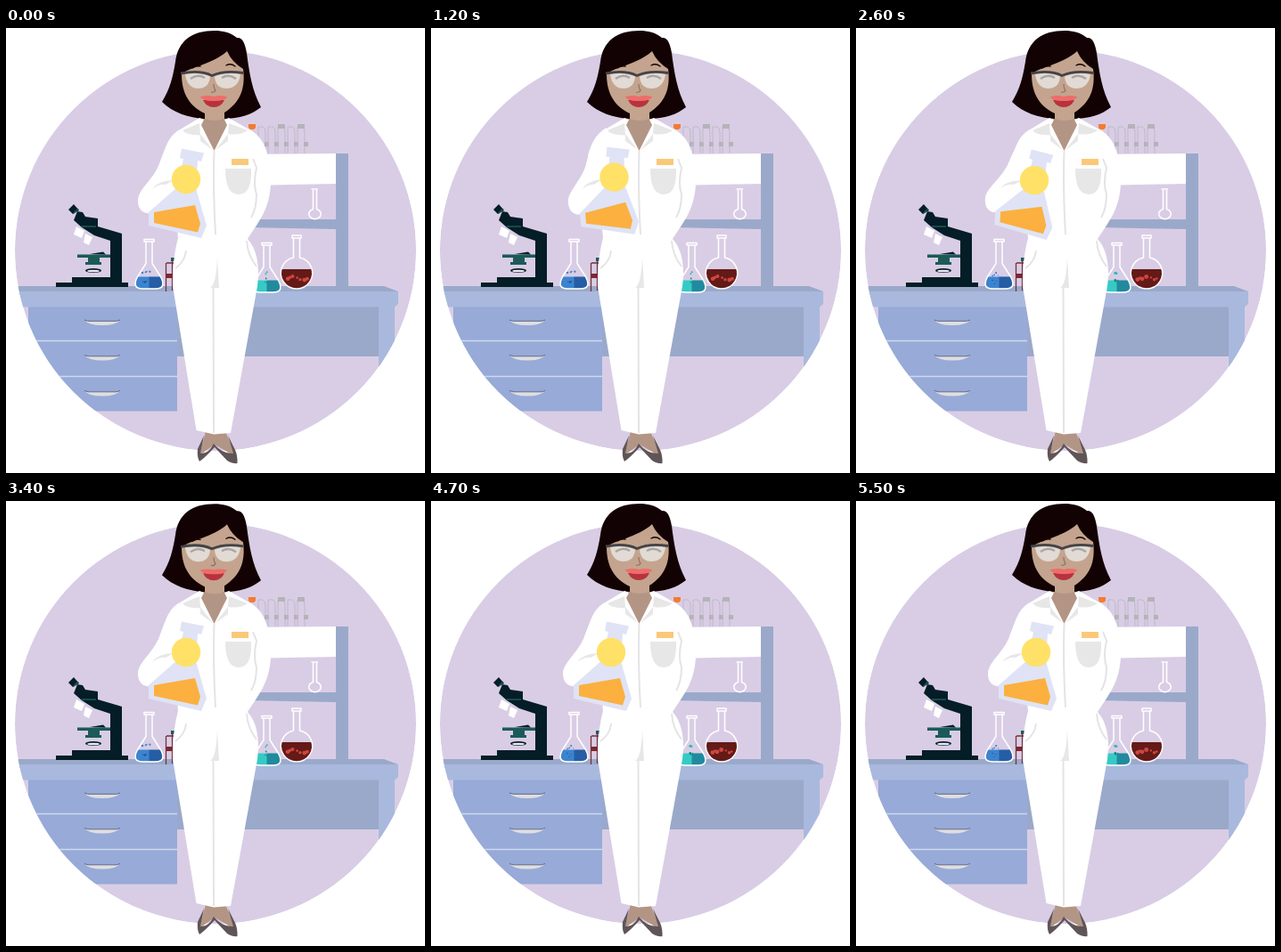
Animation of 470 by 500 pixels, one loop 6 s. Source, as an HTML page:

```html
<!DOCTYPE html>
<html lang="en">
<head>
<meta charset="utf-8">
<title>Scientist in the lab</title>
<style>
  html, body { margin: 0; width: 100%; height: 100%; overflow: hidden; background: #fff; }
  svg { display: block; width: 100vw; height: 100vh; }
  .top { fill: #9aa9ca; }
  .front { fill: #a9b9dd; }
  .drawer { fill: #97aad8; }
  .glass { fill: none; stroke: #fff; stroke-width: 1.5; stroke-linejoin: round; }
  .dark { fill: #041d26; }
  .teal { fill: #1c5a58; }
  .white { fill: #fff; }
  .fold { fill: #e7e7e8; }
  .seam { fill: none; stroke: #e4e4e6; stroke-width: 2; }
  .skin { fill: #b39585; }
  .face { fill: #c4a48e; }
  .hair { fill: #130203; }
  .line { fill: none; stroke: #130203; stroke-width: 1.3; stroke-linecap: round; }
</style>
</head>
<body>
<svg viewBox="0 0 470 500">
  <defs>
    <clipPath id="disc"><circle cx="235" cy="250" r="225"/></clipPath>
    <g id="handle">
      <path d="M88 328Q92 334 108 334T128 328L124 329H92Z" fill="#dfdfe1"/>
      <path d="M88 328L92 329.3H124L128 328" fill="none" stroke="#5d6484"/>
    </g>
    <!-- neck centred on x = 0, rim at y = 0 -->
    <g id="flask">
      <path d="M-13 42H13Q20 55 7 55H-7Q-20 55 -13 42Z" fill="currentColor"/>
      <path d="M0 42H13Q20 55 7 55H0Z" fill="#002060" opacity=".38"/>
      <path class="glass" d="M-5.500 0H5.500V2.500H-5.500ZM-3.500 3V27L-13 42Q-20 55.500 -7 55.500H7Q20 55.500 13 42L3.500 27V3"/>
    </g>
  </defs>

  <g clip-path="url(#disc)">
    <circle cx="235" cy="250" r="225" fill="#d9cde5"/>

    <!-- shelves -->
    <g id="tubes" fill="none" stroke="#bfb9c6"></g>
    <path d="M272 108H280V112L278 114H274L272 112Z" fill="#f47b30"/>
    <path class="white" d="M270 142L370 141V175L270 177Z"/>
    <path class="top" d="M270 215H370V226L270 224ZM370 141H384V291H370Z"/>
    <path class="glass" d="M342.500 181H350M344.500 182V203.500A6.700 5.700 0 1 0 348.500 203.500V182" stroke-width="1"/>

    <!-- desk -->
    <path class="top" d="M192 313H418V369H192Z"/>
    <path class="front" d="M418 313H436V400H418Z"/>
    <path class="drawer" d="M25 313H192V430.500H25Z"/>
    <path d="M25 351.500H192M25 391.500H192" stroke="#cfd8f0" stroke-width="1.500"/>
    <use href="#handle"/><use href="#handle" y="39.500"/><use href="#handle" y="79.500"/>
    <path class="top" d="M10 290H424L440 296V300H10Z"/>
    <path class="front" d="M10 296H440V310L436 313.500H10Z"/>

    <!-- microscope -->
    <path class="dark" d="M56 286H137V291H56ZM74 280H117V239L99 233L85 224L76 216L80 206L86 207L89 212L103 214V223L130 231V286H74ZM70 204L76 198L82 205L75 209Z"/>
    <path d="M76 208L81 203M85 223H101" stroke="#1c5a58" stroke-width="1.500"/>
    <path class="white" d="M79 223L88 228L85 236L76 232ZM89 231L97 235L93 244L87 241Z"/>
    <path class="teal" d="M80 254.500H117V258H80ZM92 258H105V263H92ZM89 263H107V266H89Z"/>
    <path class="dark" d="M94 254L109 251.500L112 254.500Z"/>
    <ellipse class="dark" cx="98" cy="272.500" rx="9" ry="2.600"/>
    <ellipse cx="98" cy="273" rx="7" ry="1.300" fill="#e9e9ef"/>

    <!-- glassware -->
    <use href="#flask" x="160.500" y="237.500" color="#3c84cf"/>
    <use href="#flask" x="292.500" y="241.500" color="#35cbc4"/>
    <path class="teal" d="M185 258H191V262H185Z"/>
    <path d="M180 276H189V281H180Z" fill="#7c2630"/>
    <path d="M179.500 264V296M180 264H188M186.500 262V295" stroke="#73303b" stroke-width="1.300" fill="none"/>
    <path d="M308.500 271H343.500A18 18 0 1 1 308.500 271Z" fill="#641a17"/>
    <path class="glass" d="M321 233H331V236H321ZM322.500 236V258A17.700 17.700 0 1 0 329.500 258V236"/>
    <g id="bubbles"></g>
  </g>

  <!-- feet -->
  <path class="skin" d="M224 453H246L258 482L234 468L217 480Z"/>
  <path d="M222 458L215 473Q214 482 217 487Q223 483 234 471L248 486Q255 490 259.500 489Q260 481 257 474L249 458L255 478Q243 479 233 467Q227 479 218 478Z" fill="#5f5557"/>

  <path class="skin" d="M216 98H250V112L234 140L216 112Z"/>

  <g id="head">
    <path class="hair" d="M234 3C209 3 193 14 190 38C187 56 184 68 175 83C187 95 205 101 223 102L233 92L244 102C262 102 276 97 286 89C276 70 273 51 270 28C268 15 264 10 259 11C252 5 243 3 234 3Z"/>
    <path class="face" d="M197 52C204 44 232 41 248 26Q253 38 266 46C269 69 262 84 245 95V102Q234 106 223 102V96C204 87 197 71 197 52Z"/>
    <path class="line" d="M247 42Q252 39 257 43M209 45Q213 42 218 43"/>
    <path d="M201 52Q217 49 229 54.500Q228 68 215 68Q203 67 201 52ZM263 52Q247 49 234 54.500Q235 68 248 68Q261 67 263 52Z" fill="#e2dad4"/>
    <path d="M207 57Q215 51 223 56M242 56Q250 51 258 57" fill="none" stroke="#aaa6a5" stroke-width="2.500"/>
    <path d="M196 51Q218 47 231 53.500Q245 47 266 50.500" fill="none" stroke="#424348" stroke-width="2.800"/>
    <path d="M233 63Q233 68 235 70Q234 73 230 72" fill="none" stroke="#8e7165" stroke-width="1.200"/>
    <path d="M221 81H245Q241 89 233 89Q225 89 221 81Z" fill="#b7323c"/>
    <path d="M217.500 77.500Q226 75 233 77Q240 75 248.500 77.500Q244 82.500 233 82Q222 82.500 217.500 77.500Z" fill="#ee6c6a"/>
  </g>

  <!-- suit -->
  <path class="white" d="M217 101L197 113C184 119 180 130 176 143L190 205L193 236C190 248 187 262 187 290L213.500 452L233 456.500L252 455L282 290C285 266 281 248 271 237C282 219 296 205 297 174C297 145 291 122 271 113L250 101L245 103L248 109L233.500 138L219 109L222 103Z"/>
  <path class="fold" d="M217 107L198 115Q202 121 218 120ZM250 107L271 115Q263 121 249 119ZM218 119L232 137L218 127ZM249 119L235 137L249 127ZM246 158H275Q276 187 261 187Q246 187 246 158ZM237 257L239 292H229Q236 288 237 257Z"/>
  <path class="seam" d="M233.500 138Q232 180 235 232M232.500 292L233 455"/>
  <path class="seam" d="M202 250Q201 262 190 270M270 239Q271 255 281 268M277 147L281 157Q277 175 281 187Q281 203 275 213" stroke-width="1.600"/>
  <path d="M253 147H272V154H253Z" fill="#fbc878"/>

  <g id="arm">
    <path class="white" d="M198 114C182 121 177 140 171 155C164 171 148 182 148 194C148 205 155 209 162 208L192 192L214 150Z"/>
    <path class="fold" d="M164 181Q171 171 188 171L179 176Q172 175 164 181Z"/>
    <path d="M197 135.500L222 140.500L219 150L215 149L213 180L225 222L219 236L160 222V207L192 179L199 147L195 146Z" fill="#dfe3f5"/>
    <path d="M166 207L212 199L218 220L215 229.500L166 219Z" fill="#fbb040"/>
    <circle cx="202" cy="170" r="16.200" fill="#ffe168"/>
  </g>
</svg>

<script>
const LOOP = 6000, STEP = 100;
const get = id => document.getElementById(id);
const arm = get("arm"), head = get("head"), bubbles = get("bubbles");

// test tubes in their rack
for (let i = 0; i < 5; i++) {
  const x = 283 + 11 * i, capped = i == 2 || i == 4;
  get("tubes").innerHTML += `<path d="M${x} 141V111H${x + 5}Q${x + 8} 112 ${x + 8} 117V141"/>` +
    `<path d="M${x + 7} 128h5v5h-5z${capped ? `M${x} 108h8v5h-8z` : ""}" fill="#b3b3b8" stroke="none"/>`;
}

// [time, value] poses, joined with sine easing
const swing = [[0, 0], [700, 7], [1400, -8], [2100, 7], [3000, 0]];
const nod = [[3300, 0], [4000, 6], [4500, -2], [5100, 6], [5500, 0]];

function ease(keys, t) {
  const i = keys.findIndex(k => t < k[0]);
  if (i <= 0) return 0;
  const [t0, a] = keys[i - 1], [t1, b] = keys[i];
  return a + (b - a) * (1 - Math.cos(Math.PI * (t - t0) / (t1 - t0))) / 2;
}

function random(seed) {
  const v = Math.sin(seed * 12.9898) * 43758.5453;
  return v - Math.floor(v);
}

const liquids = [
  { x: 157, y: 276, w: 9, h: 6, n: 4, r: 1.3, color: "#3c84cf" },
  { x: 155, y: 285, w: 6, h: 6, n: 3, r: 1.2, color: "#1d489b" },
  { x: 292, y: 276, w: 5, h: 4, n: 2, r: 1.6, color: "#27bdb9" },
  { x: 292, y: 285, w: 4, h: 8, n: 3, r: 1.4, color: "#128889" },
  { x: 326, y: 281, w: 25, h: 5, n: 7, r: 2.6, color: "#cf4540" }
];

// bubbles spread evenly across each liquid, with seeded jitter per pattern
function bubble(l, i, seed) {
  const s = seed + i * 3.7 + l.x;
  const cx = l.x + l.w * ((i + random(s)) / l.n - 0.5);
  const cy = l.y + l.h * (random(s + 1) - 0.5);
  return `<circle cx="${cx}" cy="${cy}" r="${l.r * (0.4 + 0.6 * random(s + 2))}" fill="${l.color}"/>`;
}
const pattern = seed => liquids.map(l =>
  Array.from({ length: l.n }, (_, i) => bubble(l, i, seed)).join("")).join("");
bubbles.innerHTML = `<g>${pattern(1)}</g><g>${pattern(2)}</g>`;

function draw(t) {
  arm.setAttribute("transform", `rotate(${ease(swing, t)} 178 130)`);
  head.setAttribute("transform", `translate(0 ${ease(nod, t)})`);
  const shown = Math.floor(t / 500) % 2;
  [...bubbles.children].forEach((g, i) => g.style.display = i == shown ? "" : "none");
}

const start = performance.now();
function tick() {
  const t = (performance.now() - start) % LOOP;
  draw(Math.floor(t / STEP) * STEP);
  requestAnimationFrame(tick);
}
tick();
</script>
</body>
</html>
```
